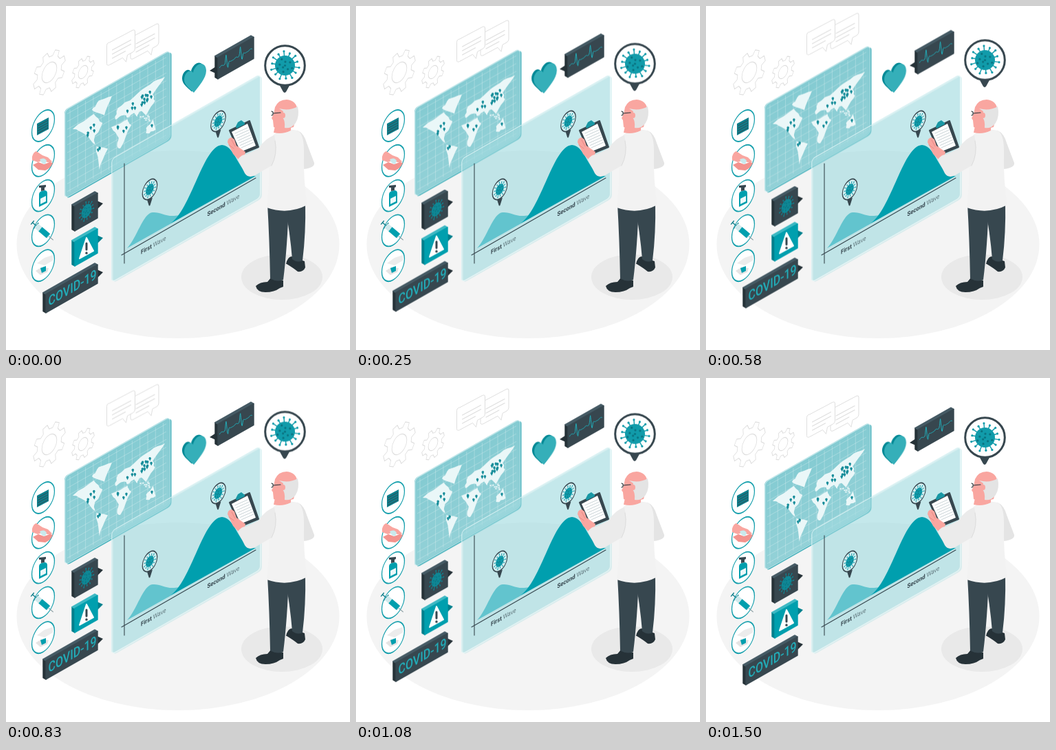
Write an HTML page that moves like this. It is 500 px wide and 500 px high and loops after 1540 ms.

```html
<!DOCTYPE html>
<html lang="en">
<head>
<meta charset="utf-8">
<title>Second wave</title>
<style>
html, body { margin: 0; width: 100%; height: 100%; overflow: hidden; background: #fff; }
svg { display: block; width: 100%; height: 100%; }
text { font-family: Roboto, Arial, sans-serif; }
.beat { transform-origin: 273px 106px; }
.line { fill: none; stroke-linecap: round; stroke-linejoin: round; }
</style>
</head>
<body>
<svg id="stage" viewBox="0 0 500 500"></svg>
<script>
const TEAL = '#009fae', DARK = '#37474f', INK = '#263238', SKIN = '#f9a6a0', PALE = '#dedede';
const SLOPE = 0.57;

const range = n => [...Array(n).keys()];
const iso = (x, y, body) => `<g transform="matrix(.866 -.5 0 1.1 ${x} ${y})">${body}</g>`;
const shape = (d, fill, extra = '') => `<path d="${d}" fill="${fill}" ${extra}/>`;
const line = (d, color, width = 1) => `<path class="line" d="${d}" stroke="${color}" stroke-width="${width}"/>`;
const floating = (rise, body) => `<g class="float" data-rise="${rise}">${body}</g>`;
const polar = (r, a) => [r * Math.cos(a), r * Math.sin(a)].map(v => +v.toFixed(2));

let seed = 7;
const random = () => (seed = seed * 16807 % 2147483647) / 2147483647;
const jitter = size => (random() - .5) * 2 * size;

// Slab seen from the left, (x, y) is the front top left corner
function slab(x, y, w, h, front, side, top) {
  const k = w * SLOPE;
  const face = (d, color) => shape(d, color, `stroke="${color}" stroke-width="1.4" stroke-linejoin="round"`);
  return face(`M${x} ${y}l-4 -2.3v${h}l4 2.3z`, side) +
    face(`M${x} ${y}l-4 -2.3l${w} ${-k}l4 2.3z`, top) +
    face(`M${x} ${y}l${w} ${-k}v${h}l${-w} ${k}z`, front);
}

// Rounded sheet of glass, its back edge shows on the right and below
function glass(x, y, w, h, front, back, body = '') {
  const rect = (dx, dy, paint) => `<rect width="${w}" height="${h}" rx="5" ${paint}
    transform="matrix(1 ${-SLOPE} 0 1 ${x + dx} ${y + dy})"/>`;
  return rect(3, 1.7, back) + rect(0, 0, front) +
    `<g transform="matrix(1 ${-SLOPE} 0 1 ${x} ${y})">${body}</g>` +
    rect(.8, .5, 'fill="none" stroke="#e6f7f8" stroke-opacity=".75" stroke-width="1.1"');
}

function virus(r, color = '#119baa') {
  const spikes = range(14).map(i => {
    const [x, y] = polar(r * (i % 2 ? 1.3 : 1.43), i * Math.PI / 7 + .15);
    return line(`M0 0L${x} ${y}`, color, r * .1) + `<circle cx="${x}" cy="${y}" r="${r * .11}" fill="${color}"/>`;
  });
  const spots = range(10).map(i => {
    const [x, y] = polar(r * Math.sqrt(i / 14), i * 2.4);
    return `<circle cx="${x}" cy="${y}" r="${r * .11}" fill="#0b7482"/>`;
  });
  return spikes.join('') + `<circle r="${r}" fill="${color}"/>` + spots.join('');
}

function gear(x, y, r, hole) {
  const tooth = [[.76, -.25], [1, -.14], [1, .14], [.76, .25]];
  const pts = range(8).flatMap(i => tooth.map(([k, a]) => polar(r * k, i * Math.PI / 4 + a + .52)));
  return iso(x, y, `<path d="M${pts.join('L')}Z" fill="#fff" stroke="${PALE}" stroke-linejoin="round"/>
    <circle r="${hole}" fill="#fff" stroke="${PALE}"/>`);
}

function bubble(x, y, tail) {
  const rows = range(3).map(i => {
    const w = i < 2 ? 27 : 19;
    return line(`M${x + 6} ${y + 10 + i * 6}l${w} ${-w * .54}`, PALE, 1.1);
  });
  return shape(`M${x + 2} ${y - 1}l34 -18q3 -1 3 2v25q0 3 -3 5l-${36 - tail} ${(36 - tail) * .54}l-2 10l-5 -6l-${tail - 9} ${(tail - 9) * .54}q-4 2 -4 -2v-26q0 -3 2 -4z`,
    '#fff', `stroke="${PALE}" stroke-linejoin="round"`) + rows.join('');
}

function marker(x, y) {
  return shape(`M${x - 4} ${y + 15}l8 -3l-3.500 11q-1 2 -2 0z`, DARK) +
    iso(x, y, `<circle r="12.4" fill="#d3eef0" stroke="${DARK}" stroke-width="1.4"/>` + virus(6.8));
}

const floor = () => `<ellipse cx="250" cy="346.5" rx="234.5" ry="136.5" fill="#f4f4f4"/>
  <ellipse cx="401" cy="394" rx="59" ry="33" fill="#e9e9e9"/>`;

function icons() {
  const mask = shape('M45 171l17 -9v17l-17 9z', '#0f7f8c') +
    range(4).map(i => line(`M46.5 ${174 + i * 3.6}l14 -7.5`, DARK, .9)).join('');
  const hands = shape('M38 219q2 -7 6 -8l9 6 8 3 6 6 -3 2 -11 -3 -7 2 -8 -3z', SKIN) +
    shape('M39 231l8 -4 8 3 9 -3 4 1q-3 8 -11 11l-10 -1z', '#f3938e') +
    shape('M49 223q7 -4 10 2l-2 5q-6 -1 -8 -7z', '#c9eaed');
  const spray = shape('M48 274q0 -4 4 -5l4 -1q4 0 4 4v14l-12 6z', TEAL) +
    shape('M51 269v-5h-3v-3l10 -1v3l-2 1v4z', DARK) + shape('M50 280l8 -4v8l-8 4z', '#eef8f9');
  const syringe = `<g transform="translate(53 327) rotate(40)">
    ${line('M-12 0h-7M-19 -3v6M-12 -5v10', '#0f7f8c', 1.4)}${line('M12 0h8', '#7d9298')}
    <rect x="-12" y="-4" width="24" height="8" rx="1" fill="#cfe9ec"/>
    <rect x="-4" y="-4" width="15" height="8" fill="${TEAL}"/></g>`;
  const paper = shape('M45 374l11 -8 12 -4v8l-12 7z', '#ececec') +
    shape('M43 385l8 -5 11 1 -2 6 -10 4z', '#e4e4e4') + shape('M50 381l8 -3v7l-6 3z', TEAL);
  const ring = '<circle r="19" fill="#fff" stroke="#17a0ad" stroke-width="1.5"/>';
  return [mask, hands, spray, syringe, paper].map((icon, i) => iso(54, 174 + i * 50.8, ring) + icon).join('');
}

// Rugged coast through a few key points
function coast(corners) {
  const pts = corners.flatMap(([x, y], i) => {
    const [nx, ny] = corners[(i + 1) % corners.length];
    return range(4).map(k => [x + (nx - x) * k / 4 + jitter(1.1), y + (ny - y) * k / 4 + jitter(1.1)].map(v => v.toFixed(1)));
  });
  return `M${pts.join('L')}Z`;
}

function worldMap() {
  const america = [[98, 178], [127, 157], [140, 171], [127, 194], [130, 203], [115, 186]];
  const greenland = [[124, 152], [135, 138], [153, 131], [142, 159]];
  const south = [[131, 203], [147, 208], [135, 237]];
  const africa = [[154, 177], [176, 165], [182, 172], [167, 207], [162, 206], [163, 191]];
  const eurasia = [[158, 165], [162, 149], [185, 132], [209, 113], [231, 103], [214, 128], [216, 137], [203, 158],
    [196, 152], [190, 161], [186, 154], [178, 163], [172, 159]];
  const australia = [[203, 177], [214, 165], [217, 179], [204, 186]];
  const lands = [america, greenland, south, africa, eurasia, australia].map(coast).join('');
  const islands = range(9).map(() => `M${199 + jitter(9)} ${164 + jitter(5)}l3 -2v3z`).join('');

  const drop = (x, y) => shape(`M${x} ${y + 2.5}l-1.6 -2.7a1.800 1.800 0 1 1 3.200 -.9z`, '#168d9a');
  const scatter = (n, x, y, w, h) => range(n).map(() => {
    const dx = jitter(w);
    return drop(x + dx, y + jitter(h) - dx * SLOPE);
  }).join('');
  const drops = scatter(5, 122, 182, 8, 6) + scatter(2, 137, 212, 3, 5) + scatter(4, 168, 179, 8, 7) +
    scatter(16, 194, 142, 19, 8) + scatter(1, 211, 177, 2, 2);

  const grid = range(13).map(i => `M${8 + i * 11.3} 4V124`).join('') + range(11).map(i => `M4 ${8 + i * 11.3}H148`).join('');
  const face = `<path d="${grid}" fill="none" stroke="#fff" stroke-opacity=".32" stroke-width=".7"/>`;
  return glass(85, 151, 152.5, 128, 'fill="url(#sea)"', 'fill="#4db3bd"', face) +
    shape(lands + islands, '#eaf7f8') + drops;
}

function chart() {
  const label = (x, y, bold) => `<text transform="matrix(.866 -.5 0 1 ${x} ${y})" font-size="9" fill="${DARK}">
    <tspan font-weight="700">${bold}</tspan> <tspan font-weight="300">Wave</tspan></text>`;
  const sheet = 'fill="#9fdade" fill-opacity=';
  return glass(153, 222, 216, 179, sheet + '".45"', sheet + '".3"') +
    shape('M176 352C190 338 199 301 213 300C226 299 232 308 252 304L262 303L240 316Z', '#62c4ce') +
    shape('M234 319C268 305 285 203 314 202C335 203 339 250 363 247Z', TEAL) +
    line('M172 229V374M168 362L363 250', DARK, 1.1) +
    label(196, 361, 'First') + label(292.5, 306, 'Second') +
    marker(209, 266.5) + marker(308.5, 167.5);
}

// Heart trace: two sharp beats over a low ripple
function trace(x, y, w) {
  const beat = (t, at) => -13 * Math.exp(-(((t - at) / .022) ** 2)) + 8 * Math.exp(-(((t - at - .055) / .022) ** 2));
  const pts = range(71).map(i => {
    const t = i / 70;
    return [x + t * w, y - t * w * SLOPE + beat(t, .2) + beat(t, .64) - Math.max(0, Math.sin(t * 28)) * 1.5].map(v => v.toFixed(1));
  });
  return line(`M${pts.join('L')}`, '#22adb9', 1);
}

function badges() {
  const dark = [DARK, INK, '#455a64'];
  const tail = (y, fill) => shape(`M132 ${y}l9 4 -9 9z`, fill);
  return tail(283, INK) + slab(100, 291, 33, 36, ...dark) + iso(117, 298, virus(8.5, '#0f8795')) +
    tail(333, '#00808d') + slab(100, 343, 33, 35, TEAL, '#007f8c', '#3cb8c3') +
    shape('M117 337L107 367 127 356Z', '#fff', 'stroke="#fff" stroke-width="2" stroke-linejoin="round"') +
    line('M117 345v9', DARK, 3) + line('M117 359v.2', DARK, 3.400) +
    tail(383, INK) + slab(58, 419, 75, 27, ...dark) +
    `<text transform="matrix(.866 -.5 0 1.08 61.5 436.5)" font-size="18.5" font-weight="500" fill="#22adb9">COVID-19</text>` +
    shape('M305 88l-9 6 9 4z', INK) + slab(308, 75, 52, 31, ...dark) + trace(310.5, 89.5, 47);
}

function heart() {
  const d = 'M272 97C268 90 259 97 259 107C259 115 267 120 273 126C280 117 291 105 291 94C291 84 283 81 277 87C274 90 272 94 272 97Z';
  return `<g class="beat">${shape(d, '#008895', 'transform="translate(-3 -1.5)"')}${shape(d, '#35afb9')}</g>`;
}

const headPin = () => shape('M396 112h18l-6.500 12q-2.500 4 -5 0z', DARK) +
  `<circle cx="405.500" cy="86.500" r="28.800" fill="#fff" stroke="${DARK}" stroke-width="3"/>
  <g transform="translate(405.500 86.500)">${virus(14.5)}</g>`;

function doctor() {
  const legs = shape('M407 375q2 -10 8 -11l19 7 1 9q-3 7 -11 6q-6 -5 -16 -11z', INK) +
    shape('M405 288L435 286Q436 330 431 370Q424 374 416 368Q413 330 405 288Z', DARK) +
    shape('M363 407q6 -6 17 -6l5 -6 18 4v9l-5 2q-8 6 -21 6q-12 0 -14 -9z', INK) +
    shape('M380 288H411Q409 350 403 398Q394 402 384 396Q383 340 380 288Z', DARK);
  const coat = shape('M424 181Q433 185 437 199L448 228Q449 235 433 237Z', '#e4e4e4') +
    shape('M389 187Q404 177 424 181Q433 186 433 210Q432 255 438 289Q410 304 379 293Q384 250 382 215Q382 194 389 187Z', '#f2f2f2');
  const head = shape('M393 165L415 167 414 181Q402 187 389 184Z', SKIN) +
    shape('M391 147Q396 136 408 136Q422 137 424 152L418 176Q400 181 389 176L388 166 386 163 389 157Z', SKIN) +
    shape('M397 149Q412 153 424 146Q427 160 421 170Q414 179 405 177Q406 167 402 162L403 153Z', '#e4e4e4') +
    `<ellipse cx="403" cy="159" rx="3" ry="4" fill="${SKIN}"/>` +
    line('M386 153l2 1v4l-2 1M388 156L399 155', INK, 1.1);
  const board = shape('M325 181L354 167 367 205 340 216Z', DARK, `stroke="${DARK}" stroke-width="2" stroke-linejoin="round"`) +
    shape('M328 183L351 171 363 203 341 212Z', '#fff') +
    range(7).map(i => line(`M${333 + i * 1.5} ${185 + i * 3.5}l18 -8`, '#bcc8cc', .8)).join('') +
    shape('M334 175l3 -6 5 -3 5 4v2l-12 6z', '#1997a4');
  const hand = shape('M322 198Q322 192 328 191L332 194 335 203 348 212 346 221 338 223 330 215Z', SKIN) +
    line('M324 202l7 5M328 195l5 9', '#e5837f', .8);
  const arm = shape('M390 188Q378 191 367 207L349 216Q343 215 337 223L347 243Q352 251 362 246L386 232Q396 214 390 188Z', '#ebebeb') +
    line('M386 232Q395 215 391 196', '#dcdcdc');
  return legs + coat + head + board + hand + arm;
}

const defs = `<defs><linearGradient id="sea" x1="0" y1="0" x2="0" y2="1">
  <stop offset="0" stop-color="#84cbd2"/><stop offset="1" stop-color="#93d1d7"/>
</linearGradient></defs>`;

document.getElementById('stage').innerHTML = defs + floor() +
  gear(63, 96.5, 27, 12.5) + gear(112, 96, 19, 8) + icons() +
  floating(17, bubble(183, 45, 30) + bubble(148.5, 54, 28)) +
  floating(8.3, worldMap()) + chart() +
  floating(8.3, badges()) + heart() + floating(8.8, headPin()) + doctor();

const timing = { duration: 1540, iterations: Infinity };
const sine = 'cubic-bezier(.37, 0, .63, 1)';

document.querySelectorAll('.float').forEach(el => el.animate(
  [0, -el.dataset.rise, 0].map(y => ({ transform: `translateY(${y}px)`, easing: sine })),
  { ...timing, delay: -30 }));

document.querySelector('.beat').animate(
  [[0, 1], [.16, 1.05], [.32, 1], [1, 1]].map(([offset, s]) => ({ offset, transform: `scale(${s})`, easing: sine })),
  timing);
</script>
</body>
</html>
```
